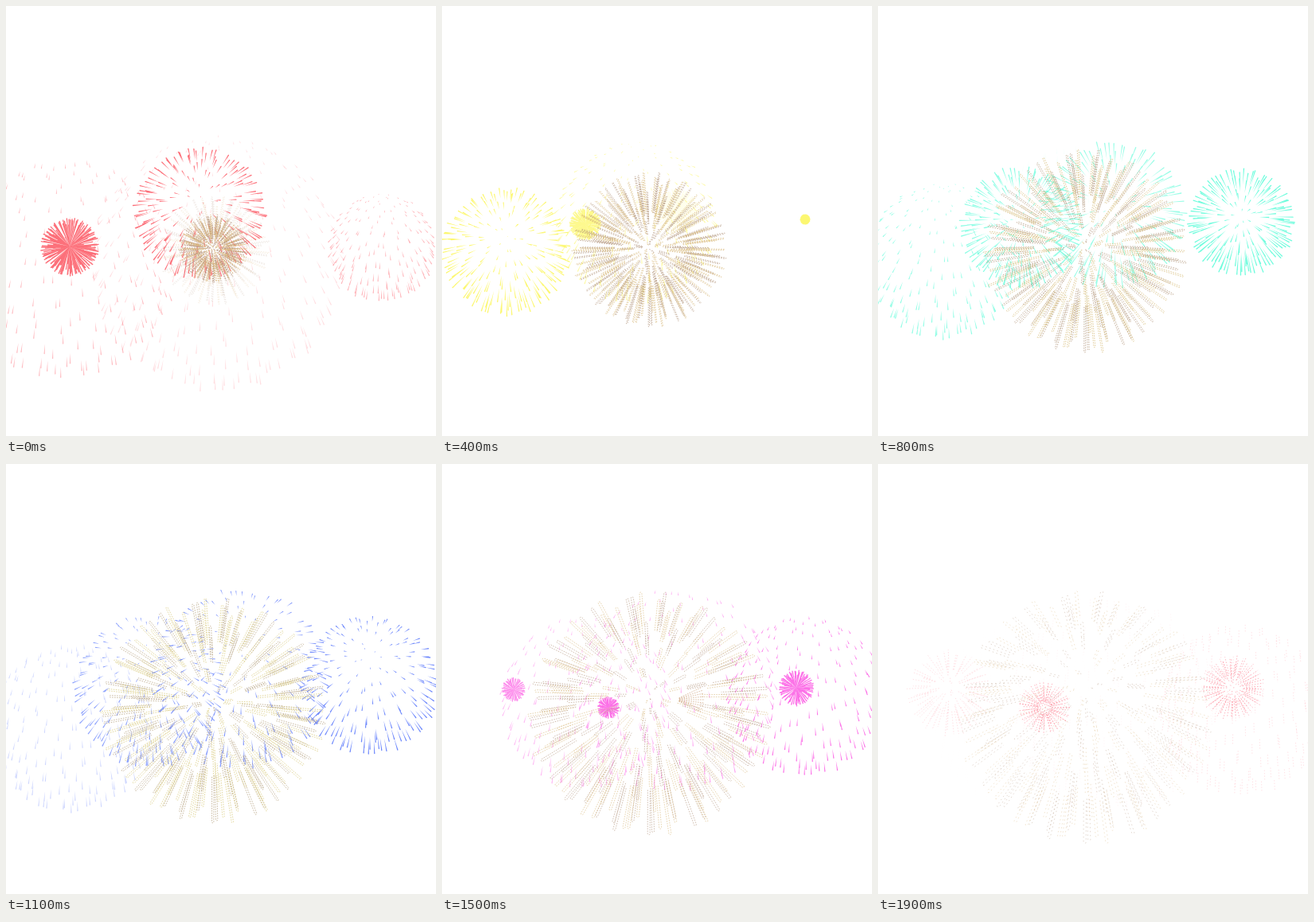
Animation, 540 px wide and 540 px high, one loop 2 s. Source, as an HTML page with a canvas:

```html
<!DOCTYPE html>
<html lang="en">
<head>
<meta charset="utf-8">
<title>Fireworks</title>
<style>
  html, body { margin: 0; width: 100%; height: 100%; overflow: hidden; background: #fff; }
  canvas { display: block; width: 100vw; height: 100vh; }
</style>
</head>
<body>
<canvas id="stage" width="540" height="540"></canvas>
<script>
const ctx = document.getElementById('stage').getContext('2d');
const LOOP = 2000, STEP = 100, GOLDEN = 2.399963;

// Times are seconds; born may lie before the start of the loop.
const bursts = [
  { x: 75, y: 299, r: 145, born: -1.3, life: 1.62, n: 190 },
  { x: 472, y: 288, r: 78, born: -0.9, life: 1.26, n: 170 },
  { x: 265, y: 296, r: 171, born: -1.2, life: 1.36, n: 260 },
  { x: 243, y: 254, r: 115, born: -0.56, life: 1.4, n: 190 },
  { x: 80, y: 302, r: 110, born: -0.17, life: 1.5, n: 200 },
  { x: 180, y: 274, r: 115, born: 0.32, life: 1.6, n: 180, ink: 0.75 },
  { x: 295, y: 258, r: 136, born: 0.3, life: 1.7, n: 170, ink: 0.8, rise: 0.6 },
  { x: 456, y: 268, r: 108, born: 0.375, life: 1.8, n: 180 },
  { x: 445, y: 281, r: 53, born: 1.27, life: 2, n: 110, g: 0, trail: 0.45 },
  { x: 209, y: 306, r: 48, born: 1.357, life: 2, n: 90, g: 0, trail: 0.45 },
  { x: 90, y: 283, r: 80, born: 1.413, life: 0.85, n: 80, trail: 0.3, ink: 0.75 }
];
const golds = [
  { x: 262, y: 305, r: 92, born: -0.6, life: 0.82, n: 120, g: 3, spread: 0.7 },
  { x: 260, y: 305, r: 168, born: -0.208, life: 9, n: 230, k: 1.44, g: 3, spread: 0.7 }
];

function random(seed) {
  return () => {
    seed = (seed * 16807) % 2147483647;
    return seed / 2147483647;
  };
}

// Directions over a sphere seen from the front; a larger spread fills the middle.
function sphere(count, seed, spread = 0.5) {
  const rnd = random(seed);
  return Array.from({ length: count }, (_, i) => {
    const z = 1 - 2 * (i + rnd()) / count;
    const a = i * GOLDEN + (rnd() - 0.5) * 0.15;
    const s = (1 - z * z) ** spread * (0.95 + rnd() * 0.05);
    return { x: Math.cos(a) * s, y: Math.sin(a) * s };
  });
}
[...bursts, ...golds].forEach((b, i) => { b.rays = sphere(b.n, 4211 + i * 977, b.spread); });

const clamp = v => Math.max(0, Math.min(1, v));

// Linear value from [time, value] stops.
function track(stops, t) {
  let i = 1;
  while (i < stops.length - 1 && stops[i][0] < t) i++;
  const [t0, v0] = stops[i - 1], [t1, v1] = stops[i];
  return v0 + (v1 - v0) * clamp((t - t0) / (t1 - t0));
}

const hues = [[0, -4], [0.4, 58], [0.8, 167], [1.1, 229], [1.3, 276], [1.5, 309], [1.9, 352]];
const goldHues = [[0, 25], [0.8, 31], [1.1, 38], [1.3, 31], [1.5, 27], [1.9, 25]];
const goldLights = [[0, 60], [0.8, 58], [1.1, 60], [1.5, 66], [1.9, 66]];

function place(b, d, age) {
  const reach = b.r * (1 - Math.exp(-(b.k ?? 2.4) * age));
  return { x: b.x + d.x * reach, y: b.y + d.y * reach + (b.g ?? 20) * age * age };
}

// Head, tail and unit direction of one spark.
function spark(b, d, age, tailAge) {
  const head = place(b, d, age), tail = place(b, d, tailAge);
  const dx = head.x - tail.x, dy = head.y - tail.y;
  const len = Math.hypot(dx, dy) || 0.01;
  return { head, tail, len, ux: dx / len, uy: dy / len };
}

function drawBurst(b, t, dim) {
  const age = t - b.born;
  if (age <= 0 || age >= b.life) return;
  const fading = dim < 0.8;
  const grown = b.rise ? clamp(age / b.rise) : 1;
  ctx.globalAlpha = clamp((b.life - age) / 0.7) * (b.ink ?? 0.95) * grown * dim;
  ctx.fillStyle = ctx.strokeStyle = `hsl(${track(hues, t)} 96% 70%)`;
  ctx.lineWidth = 0.9;
  ctx.setLineDash(fading ? [1.5, 2] : []);
  const from = Math.max(0, age - (b.trail ?? 0.2));
  ctx.beginPath();
  for (const d of b.rays) {
    const { head, tail, len, ux, uy } = spark(b, d, age, from);
    ctx.moveTo(tail.x, tail.y);
    if (fading) {
      ctx.lineTo(head.x, head.y);
      continue;
    }
    const w = Math.min(0.7, 0.45 + len * 0.02);
    ctx.lineTo(head.x - uy * w, head.y + ux * w);
    ctx.lineTo(head.x + ux * 0.6, head.y + uy * 0.6);
    ctx.lineTo(head.x + uy * w, head.y - ux * w);
    ctx.closePath();
  }
  if (fading) ctx.stroke(); else ctx.fill();
}

// Long hollow trails with a rounded tip.
function drawGold(b, t, dim) {
  const age = t - b.born;
  if (age >= b.life) return;
  const hue = track(goldHues, t), light = track(goldLights, t);
  ctx.globalAlpha = clamp((b.life - age) / 0.7) * dim;
  ctx.lineWidth = 0.75;
  ctx.setLineDash(dim < 0.8 ? [1.5, 3.5] : [1.5, 1.5]);
  for (let tone = 0; tone < 2; tone++) {
    ctx.strokeStyle = `hsl(${hue + tone * 12} ${26 + tone * 28}% ${light + tone * 6}%)`;
    ctx.beginPath();
    b.rays.forEach((d, i) => {
      if (i % 2 !== tone) return;
      const { head, tail, len, ux, uy } = spark(b, d, age, age * 0.4);
      const w = Math.min(0.2 + age * 0.75, 1.6, len * 0.1);
      const a = Math.atan2(uy, ux);
      ctx.moveTo(tail.x - uy * w, tail.y + ux * w);
      ctx.lineTo(head.x - uy * w, head.y + ux * w);
      ctx.arc(head.x, head.y, w, a + Math.PI / 2, a - Math.PI / 2, true);
      ctx.lineTo(tail.x + uy * w, tail.y - ux * w);
    });
    ctx.stroke();
  }
}

function drawFan(t, dim) {
  if (t < 1.15 || t > 1.75) return;
  const len = 30 + (t - 1.3) * 35;
  ctx.globalAlpha = dim;
  ctx.strokeStyle = 'hsl(27 45% 68%)';
  ctx.lineWidth = 0.8;
  ctx.setLineDash([1.5, 1.4]);
  ctx.beginPath();
  for (let i = -4; i <= 4; i++) {
    const a = i * 0.11;
    ctx.moveTo(293 + 5 * Math.cos(a), 296 + 5 * Math.sin(a));
    ctx.lineTo(293 + len * Math.cos(a), 296 + len * Math.sin(a));
  }
  ctx.stroke();
}

function draw(now) {
  const t = Math.floor((now % LOOP) / STEP) * STEP / 1000;
  const dim = 1 - 0.42 * clamp((t - 1.5) / 0.4);
  ctx.globalAlpha = 1;
  ctx.fillStyle = '#fff';
  ctx.fillRect(0, 0, 540, 540);
  bursts.forEach(b => drawBurst(b, t, dim));
  golds.forEach(b => drawGold(b, t, dim));
  drawFan(t, dim);
}

const start = performance.now();
function loop() {
  draw(performance.now() - start);
  requestAnimationFrame(loop);
}
loop();
</script>
</body>
</html>
```
